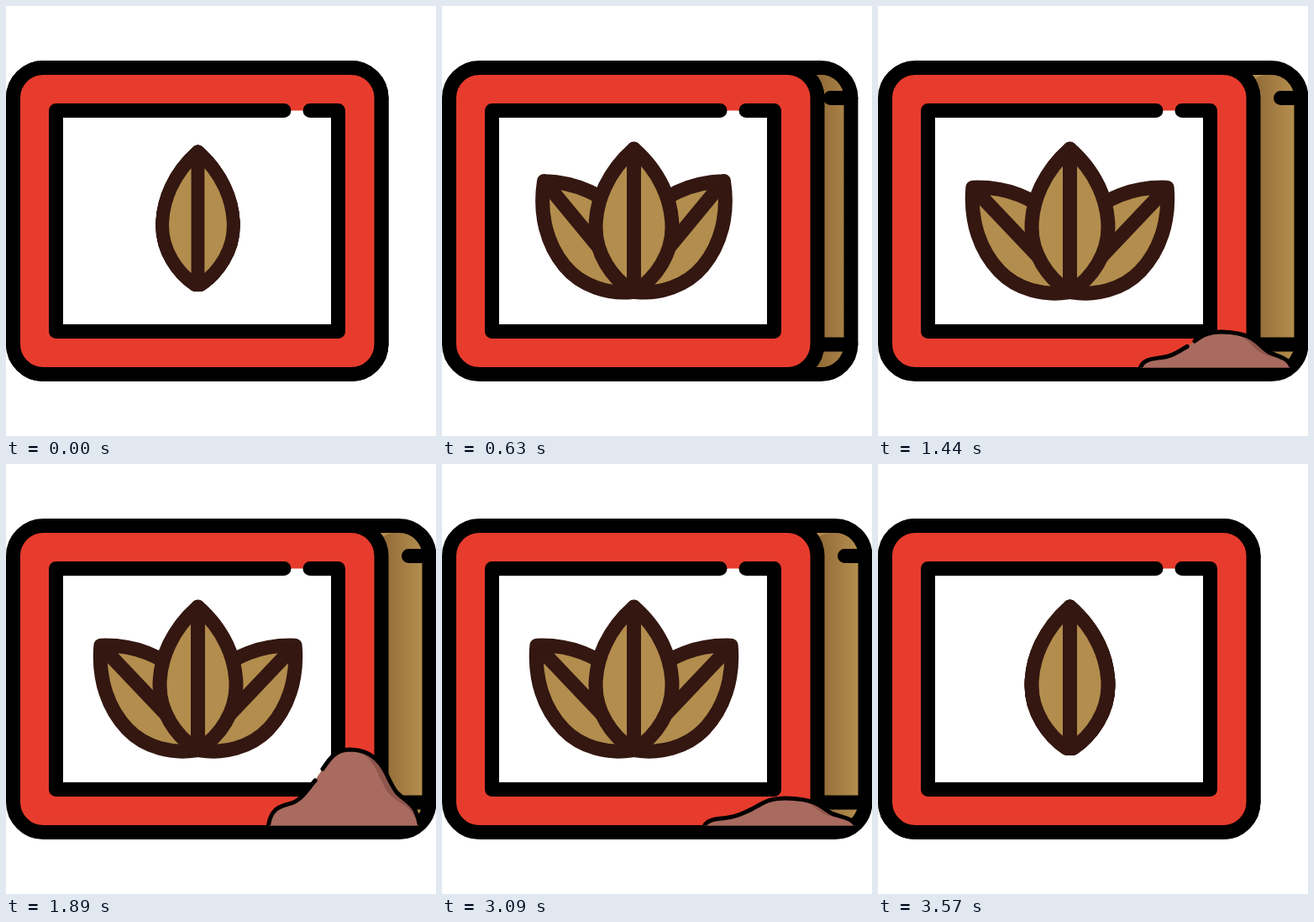
An HTML page for the animation above (3.6 s loop, 512 by 512 pixels).

```html
<!DOCTYPE html>
<html lang="en">
<head>
<meta charset="utf-8">
<title>Cocoa box</title>
<style>
  html, body { margin: 0; height: 100%; overflow: hidden; background: #fff; }
  svg { display: block; width: 100vw; height: 100vh; }
  .line { fill: none; stroke: #000; stroke-width: 17; stroke-linecap: round; stroke-linejoin: round; }
  .leaf { fill: #b28d4d; stroke: #341711; stroke-width: 17; stroke-linecap: round; stroke-linejoin: round; }
  .edge { fill: none; stroke: #000; stroke-width: 5; stroke-linecap: round; stroke-linejoin: round; vector-effect: non-scaling-stroke; }
</style>
</head>
<body>
<svg viewBox="0 0 512 512">
  <defs>
    <rect id="box" x="8.5" y="73.5" width="438.5" height="365" rx="36" stroke="#000" stroke-width="17"/>
    <path id="leaf" class="leaf" d="M228.5 170C198 197 183 231 183 264C183 295 202 323 225 338.5H232C255 323 274 295 274 264C274 231 259 197 228.5 170V338"/>
    <linearGradient id="shade" gradientUnits="userSpaceOnUse" x1="452" x2="494">
      <stop offset="0" stop-color="#946d39"/>
      <stop offset="1" stop-color="#946d39" stop-opacity="0"/>
    </linearGradient>
    <clipPath id="floor"><path d="M0 0H512V430.5H0Z"/></clipPath>
  </defs>

  <g id="back">
    <use href="#box" fill="#b28d4d"/>
    <rect id="dark" x="380" y="82" width="58.5" height="348" rx="27" fill="url(#shade)"/>
    <path class="line" d="M422.5 109.5H447M380 403H447"/>
  </g>

  <use href="#box" fill="#e73c2d"/>
  <path fill="#fff" d="M59.5 124.5H395.5V387.5H59.5Z"/>
  <path class="line" d="M331 124.5H59.5V387.5H395.5V124.5H362"/>

  <g id="plant">
    <use id="left" href="#leaf"/>
    <use id="right" href="#leaf"/>
    <use href="#leaf"/>
  </g>

  <g clip-path="url(#floor)">
    <g id="heap">
      <path fill="#8f564d" d="M312 433C315 408 328 407 338 404C352 400 358 388 368 376L377 362C385 350 392 338.5 409 338.5C425 339 435 343 445 355C455 368 456 378 465 390C472 398 482 402 487 412C491 420 492 425 493 433Z"/>
      <path fill="#a96a5f" d="M312 433C315 408 328 407 338 404C352 400 358 388 368 376L377 362C385 350 392 338.5 409 338.5C422 339 431 347 438 358C446 371 448 382 457 393C465 402 477 405 483 414C487 420 490 426 491 433Z"/>
      <path class="edge" d="M312 433C315 408 328 407 338 404C352 400 358 388 368 376"/>
      <path class="edge" d="M377 362C385 350 392 338.5 409 338.5C425 339 435 343 445 355C455 368 456 378 465 390C472 398 482 402 487 412C491 420 492 425 493 433"/>
      <path class="edge" id="joint"/>
    </g>
  </g>
</svg>
<script>
  const LOOP = 3600, STEP = 30;
  const el = id => document.getElementById(id);
  const set = (id, name, value) => el(id).setAttribute(name, value);
  // progress from a to b, held at 0 and 1 outside
  const ramp = (t, a, b) => Math.min(1, Math.max(0, (t - a) / (b - a)));

  function heapSize(t) {
    if (t < 1680) return 0.854 * ramp(t, 1155, 1680);
    if (t < 2190) return 0.854 + 0.146 * (1 - (1 - ramp(t, 1680, 2190)) ** 4);
    return 1 - ramp(t, 2190, 3300) ** 2.1;
  }

  function draw(t) {
    const depth = 57 * (ramp(t, 420, 720) - ramp(t, 3100, 3550));
    set('back', 'transform', `translate(${depth})`);
    set('shade', 'gradientTransform', `translate(${-depth})`);
    set('dark', 'opacity', ramp(depth, 28, 40));

    const angle = 43.5 * (ramp(t, 30, 690) - ramp(t, 3100, 3570));
    set('left', 'transform', `rotate(${-angle} 228.5 338)`);
    set('right', 'transform', `rotate(${angle} 228.5 338)`);

    const grow = ramp(t, 0, 300);
    set('plant', 'transform',
      `translate(228 229) scale(${0.93 + 0.07 * grow} ${0.94 + 0.06 * grow}) translate(-228 -229)`);

    const size = heapSize(t);
    set('heap', 'transform', `translate(0 431) scale(1 ${size}) translate(0 -431)`);
    set('heap', 'visibility', size > 0 ? 'visible' : 'hidden');
    const join = ramp(t, 2220, 2700);
    set('joint', 'd', `M368 376L${368 + 9 * join} ${376 - 14 * join}`);
  }

  function tick() {
    draw(Math.floor(performance.now() % LOOP / STEP) * STEP);
    requestAnimationFrame(tick);
  }
  tick();
</script>
</body>
</html>
```
